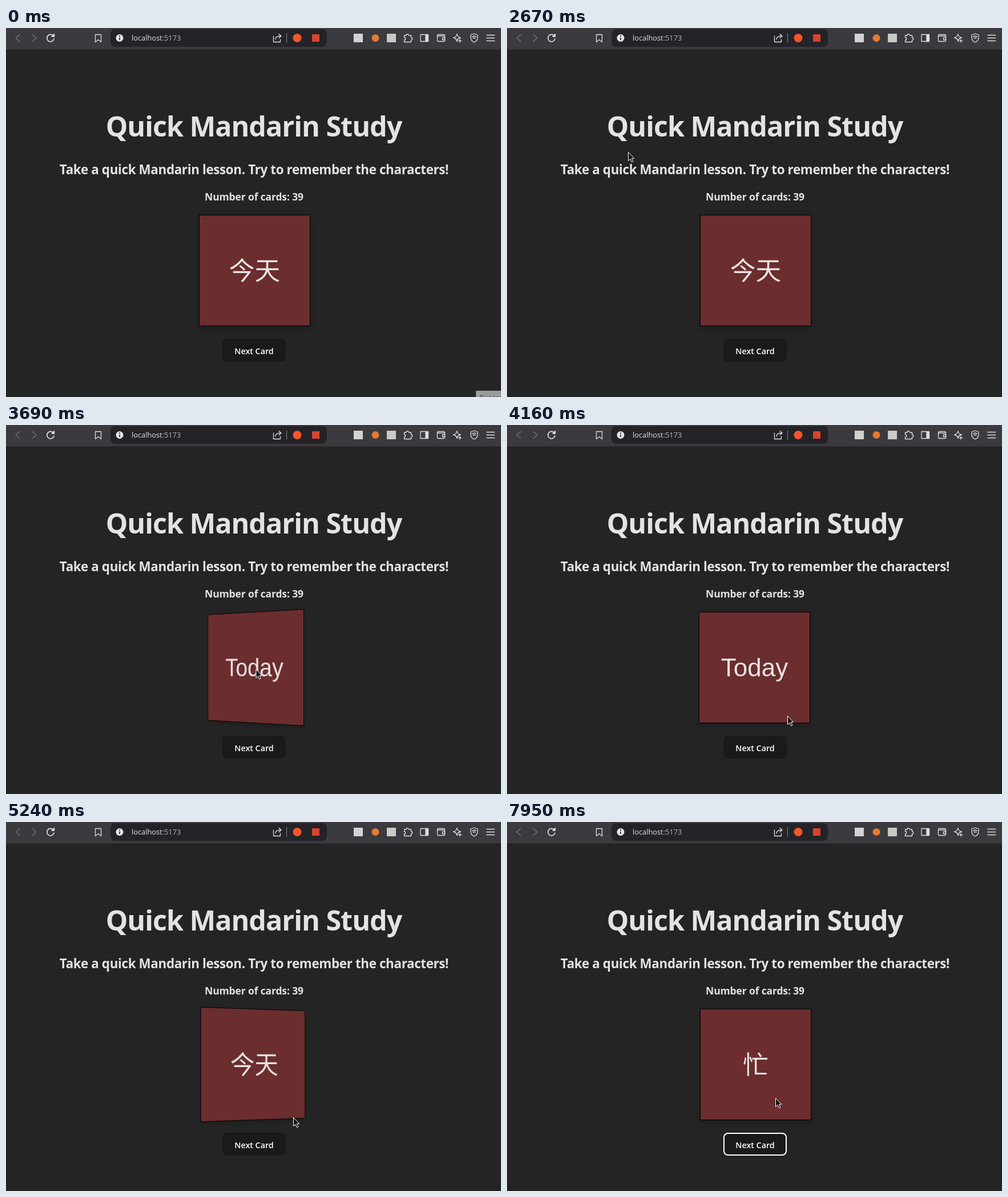
An HTML page for the animation above (8000 ms loop, 867 by 646 pixels).

```html
<!DOCTYPE html>
<html lang="en">
<head>
<meta charset="utf-8">
<title>Quick Mandarin Study</title>
<style>
  html, body { margin: 0; width: 100%; height: 100%; overflow: hidden; background: #242424; }
  svg { position: absolute; left: 0; top: 0; }
  text { font-family: "Open Sans", "Noto Sans", sans-serif; fill: #e3e3e3; }
  .bold { font-weight: 700; text-anchor: middle; }
  .icon { fill: none; stroke: #dededf; stroke-width: 1.3; stroke-linejoin: round; stroke-linecap: round; }
  .scene, .card, .face { position: absolute; width: 195px; height: 195px; }
  .scene { left: 338px; top: 327px; perspective: 1000px; perspective-origin: 96.5px 50%; }
  .card { transform-style: preserve-3d; transform-origin: 96.5px 50%; }
  .face {
    box-sizing: border-box; border: 1px solid #000; background: #6b2d2d;
    box-shadow: 0 4px 8px rgba(0, 0, 0, .2); backface-visibility: hidden;
    color: rgba(255, 255, 255, .87); text-align: center;
  }
  #front { font: 500 44.8px/187px "Noto Sans CJK SC", "Noto Sans CJK JP", "Noto Sans CJK", sans-serif; }
  #back { font: 44px/194px "Liberation Sans", Arial, sans-serif; transform: rotateY(180deg); }
</style>
</head>
<body>
<svg width="867" height="646">
  <rect width="867" height="37.5" fill="#3b3a3f"/>
  <rect x="183" y="2" width="379" height="31" rx="8" fill="#242328"/>

  <!-- navigation -->
  <g class="icon">
    <path d="M24 11.5l-7 6 7 6m22-12l7 6-7 6" stroke="#77767c"/>
    <path d="M83 14A6.2 6.2 0 1 0 84 19" stroke-width="1.7"/>
    <path d="M84.5 10.5V15H80Z" fill="#dededf"/>
    <path d="M156.5 11.5h10v13l-5-4-5 4Z"/>
    <path d="M468.5 14v10.5h12V20M472 20q0-6 9-6m-3-3.500l4 3.500-4 3.500"/>
    <path d="M491.5 10v15" stroke="#77767c"/>
  </g>
  <circle cx="199" cy="17.5" r="6.5" fill="#e6e6e8"/>
  <path d="M199 16.500v4.500m0-8v2" stroke="#242328" stroke-width="1.7"/>
  <text x="220" y="22" font-size="12.8">localhost<tspan fill="#b5b4ba">:5173</tspan></text>

  <!-- badges -->
  <circle cx="510" cy="17.5" r="7.5" fill="#f4552a"/>
  <rect x="536" y="11" width="13" height="13" fill="#d8432f"/>
  <rect x="609" y="10" width="16" height="15" fill="#d2d2d2"/>
  <circle cx="647" cy="17.5" r="6.5" fill="#e57a30"/>
  <rect x="667" y="10" width="16" height="15" fill="#c9c9c6"/>

  <!-- browser tools -->
  <g class="icon">
    <path d="M697.5 13h3.500a2 2 0 0 1 4.500 0h4v3.500a2 2 0 0 1 0 4.500v3.500h-12V21a2 2 0 0 0 0-4.500Z"/>
    <rect x="726" y="11.5" width="13.500" height="12"/>
    <path d="M735 12h4v11h-4Z" fill="#dededf"/>
    <rect x="755.500" y="11.500" width="13" height="12" rx="2"/>
    <path d="M756 14h12m1 3h-4.500v3.500h4.500"/>
    <path d="M790 10.500q.5 5.500 6.500 6.500-6 1-6.500 6.500-1-5.500-6.500-6.500 5.500-1 6.500-6.500m5 9.500v5m-2.500-2.500h5"/>
    <path d="M820 10l6 2v5q0 5.500-6 8-6-2.500-6-8v-5Zm-3.500 5.500q3.500-2.500 7 0M818 18q2-1.500 4 0"/>
    <path d="M842 12.500h13.500m-13.500 5h13.500m-13.500 5h13.500" stroke-width="1.600"/>
  </g>

  <!-- page -->
  <text class="bold" x="434" y="189.5" font-size="48.5" letter-spacing="-1.03">Quick Mandarin Study</text>
  <text class="bold" x="434.5" y="256" font-size="22.4" letter-spacing="-.36">Take a quick Mandarin lesson. Try to remember the characters!</text>
  <text class="bold" x="434.5" y="302" font-size="17.5" letter-spacing="-.14">Number of cards: 39</text>

  <rect x="379" y="544" width="111" height="40" rx="8" fill="#1a1a1a"/>
  <rect id="hover" x="379.5" y="544.5" width="110" height="39" rx="7.5" fill="none" stroke="#646cff"/>
  <rect id="ring" x="380" y="545" width="109" height="38" rx="7" fill="none" stroke="#fff" stroke-width="2"/>
  <text class="bold" x="434.5" y="570.5" font-size="14.3" style="font-weight:600;fill:#fff">Next Card</text>

  <g id="popup">
    <rect x="823" y="635" width="44" height="11" fill="#9b9b9b"/>
    <text x="829" y="652" font-size="12.8" style="fill:#3a3a3a">Record</text>
  </g>
</svg>

<div class="scene">
  <div class="card" id="card">
    <div class="face" id="front" lang="zh-Hans">今天</div>
    <div class="face" id="back">Today</div>
  </div>
</div>

<svg width="867" height="646">
  <g id="cursor" fill="#111" stroke="#fff" stroke-linejoin="round">
    <path id="arrow" d="M.5 .5v15l3.500-3.300 2.300 5.400 2.500-1-2.300-5.400h4.200Z"/>
    <path id="hand" d="M-1.500 12V2a1.500 1.500 0 0 1 3 0v5l6.500 1.300q1.500 .5 1.500 2.200v4q0 2.500-1.500 5.500h-8q-2-3.500-5-6.500-1-2 1-2.700Z"/>
  </g>
</svg>

<script>
const LOOP = 8000, FLIP = 800;
const $ = id => document.getElementById(id);
const clamp = v => Math.min(1, Math.max(0, v));
const smooth = k => k * k * (3 - 2 * k);

// Pointer strokes: start, end, then the point reached; it rests in between
const strokes = [
  [0, 400, 565, 625], [1070, 1500, 68, 78], [1500, 1620, 85, 75], [1620, 1910, 96, 51],
  [1910, 2670, 212, 217], [2670, 2740, 281, 306], [2740, 3300, 430, 416],
  [3560, 4160, 491, 509], [4350, 4420, 507, 512], [4800, 5240, 503, 517],
  [5240, 5560, 463, 559], [7770, 7950, 470, 483]
];

const pointer = t => strokes.reduce(([x, y], [start, end, toX, toY]) => {
  const k = smooth(clamp((t - start) / (end - start)));
  return [x + (toX - x) * k, y + (toY - y) * k];
}, [830, 665]);

// The CSS "ease" curve, cubic-bezier(.25, .1, .25, 1)
function ease(x) {
  if (x <= 0 || x >= 1) return clamp(x);
  const bezier = (a, b, s) => 3 * a * s * (1 - s) ** 2 + 3 * b * s * s * (1 - s) + s ** 3;
  let lo = 0, hi = 1;
  for (let i = 0; i < 20; i++) {
    const mid = (lo + hi) / 2;
    if (bezier(.25, .25, mid) < x) lo = mid; else hi = mid;
  }
  return bezier(.1, 1, lo);
}

function draw() {
  const t = performance.now() % LOOP;
  const [x, y] = pointer(t);
  const overButton = x > 379 && x < 490 && y > 544 && y < 584;
  const show = (id, on) => $(id).style.display = on ? "" : "none";

  $("cursor").setAttribute("transform", `translate(${x} ${y})`);
  show("arrow", !overButton);
  show("hand", overButton);
  show("popup", t < 70);
  show("ring", t >= 6240);
  $("hover").style.opacity = ease((t - 5500) / 250);

  const turn = 180 * (ease((t - 3266) / FLIP) - ease((t - 4755) / FLIP));
  $("card").style.transform = `rotateY(${turn}deg)`;
  $("front").textContent = t < 6370 ? "今天" : "忙";
  requestAnimationFrame(draw);
}
draw();
</script>
</body>
</html>
```
